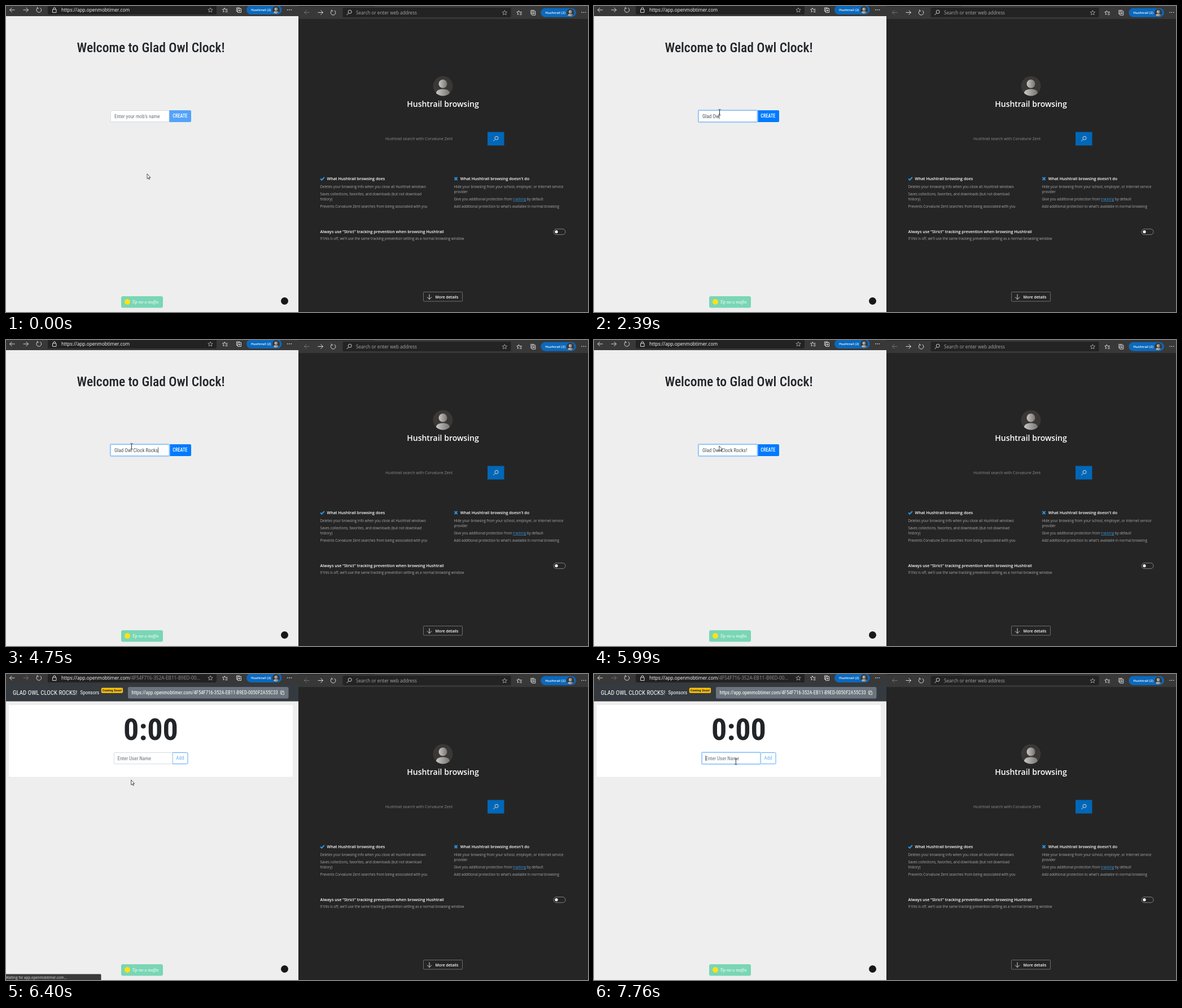
Write an HTML page that moves like this. It is 1031 by 543 pixels and loops after 8000 ms.

```html
<!DOCTYPE html>
<html lang="en">
<head>
<meta charset="utf-8">
<title>Mob timer demo</title>
<style>
html, body { margin: 0; width: 100%; height: 100%; overflow: hidden; background: #252525; }
svg { display: block; width: 1031px; height: 543px; }
text { white-space: pre; }
.site { font-family: "Roboto Condensed", "Open Sans", "Noto Sans", sans-serif; font-stretch: 75%; }
.ui { font-family: "Open Sans", "Noto Sans", sans-serif; }
.note { font-size: 6.22px; fill: #aaa; }
.head { font-size: 7.1px; font-weight: 600; fill: #fff; }
.line { fill: none; stroke: #d8d8d8; stroke-width: 1; }
</style>
</head>
<body>
<svg viewBox="0 0 1031 543">
  <defs>
    <linearGradient id="grey" x1="0" x2="1"><stop stop-color="#c9c7c5"/><stop offset="1" stop-color="#777472"/></linearGradient>
    <clipPath id="left"><path d="M0 0H518V543H0z"/></clipPath>
    <g id="person">
      <circle r="17.5" fill="#3a3735"/>
      <circle cy="-4" r="7.5" fill="url(#grey)"/>
      <path d="M-12 12.800C-12 8-7 5.500 0 5.500S12 8 12 12.800A17.500 17.500 0 0 1-12 12.800z" fill="url(#grey)"/>
    </g>
    <path id="arrow" class="line" d="M4.500 0H-4.500M-.5-4L-4.500 0L-.5 4"/>
    <g id="lens" class="line"><circle cx="1.200" cy="-1.200" r="3"/><path d="M-1 1L-4.500 4.500"/></g>
    <g id="tools">
      <g class="line">
        <path d="M55.800 3.500A4.300 4.300 0 1 0 60.500 3.300M55.400 1.800V4.200H58"/>
        <path stroke="#999" d="M362 3l1.200 2.800 3 .2-2.300 2 .8 3-2.700-1.700-2.700 1.700.8-3-2.300-2 3-.2z"/>
        <path d="M387 3.500l1 2.300 2.500.2M387 3.500l-1 2.300-2.500.2 2 1.800-.6 2.800 2-1.200M389 8H392.500M388.500 10.500H392.500M390.500 5.800H392.500"/>
        <path d="M410.500 4.500H416.500V11.500H410.500zM410 9.500H408.500V3H414.500M413.500 6V10M411.500 8H415.500"/>
      </g>
      <rect x="426" y="-1" width="62.500" height="16" rx="8" fill="#0b69bd"/>
      <text class="ui" x="434" y="9" font-size="6" font-weight="600" fill="#fff">Hushtrail (2)</text>
      <use href="#person" transform="translate(478.500 7) scale(.38)"/>
      <path d="M498 6.700h1.500M501.300 6.700h1.500M504.600 6.700h1.500" stroke="#ddd" stroke-width="1.400"/>
    </g>
  </defs>

  <g clip-path="url(#left)">
    <path fill="#eee" d="M0 17H518V543H0z"/>
    <path fill="#383838" d="M0 0H518V18H0z"/>
    <rect x="74" y="-4" width="299" height="19" rx="2" fill="#222"/>
    <use href="#arrow" x="11" y="7"/>
    <use id="forward" href="#arrow" transform="translate(35 7) scale(-1 1)"/>
    <path class="line" d="M82.500 6H89V11.500H82.500zM84 6V4a1.800 1.800 0 0 1 3.500 0V6"/>
    <use href="#tools"/>
    <text class="ui" x="98" y="10.300" font-size="8.200" fill="#fff">https://app.openmobtimer.com<tspan id="path" fill="#8f8f8f">/4F54F716-352A-EB11-B9ED-00...</tspan></text>

    <g id="home" class="site">
      <text x="256.500" y="82" text-anchor="middle" font-size="23.500" font-weight="500" fill="#212529">Welcome to Glad Owl Clock!</text>
      <path id="create" fill="#007bff" d="M289 185H326a2 2 0 0 1 2 2V204a2 2 0 0 1-2 2H289z"/>
      <rect id="ring1" x="183.700" y="183.700" width="106.800" height="23.600" rx="3" fill="#b3d1f2"/>
      <rect id="box1" x="185.300" y="185.500" width="103.700" height="20" rx="1.500" fill="#fff"/>
      <text x="308.300" y="198.300" text-anchor="middle" font-size="8.300" font-weight="500" fill="#fff">CREATE</text>
      <text id="name" x="192" y="198.800" font-size="9"></text>
    </g>

    <g id="mob" class="site">
      <path fill="#343a40" d="M0 18H518V48.500H0z"/>
      <text id="brand" x="12" y="37" font-size="10.900" fill="#fff"></text>
      <g id="links">
        <text x="41.300" y="36" font-size="9" fill="#fff">Sponsors</text>
        <rect x="78.500" y="24.500" width="38.300" height="9.300" rx="2" fill="#ffc107"/>
        <text x="97.600" y="31.300" text-anchor="middle" font-size="6.200" font-weight="700" fill="#212529">Coming Soon!</text>
      </g>
      <rect x="216" y="23" width="284.500" height="20.500" rx="2.500" fill="#6c757d"/>
      <text x="222.500" y="36" font-size="8.700" fill="#fff">https://app.openmobtimer.com/4F54F716-352A-EB11-B9ED-0050F2A55C33</text>
      <path class="line" stroke="#fff" d="M488 35.500H486.500V30H491.500V31.500M488.500 31.800H492.500V36.500H488.500z"/>
      <rect x="4.500" y="54.500" width="504" height="128.500" rx="1" fill="#fff" stroke="#e2e2e2" stroke-width=".5"/>
      <text x="256.500" y="116.500" text-anchor="middle" font-size="54" font-weight="700" fill="#212529">0:00</text>
      <path fill="#fff" stroke="#54a5fc" d="M295 139.500H320.500a1.500 1.500 0 0 1 1.500 1.500V158a1.500 1.500 0 0 1-1.500 1.500H295z"/>
      <rect id="ring2" x="189.700" y="137.700" width="106.600" height="23.600" rx="3" fill="#bfdeff"/>
      <rect id="box2" x="191.300" y="139.500" width="103.500" height="20" rx="1.500" fill="#fff"/>
      <text x="308.400" y="152.300" text-anchor="middle" font-size="9" fill="#6bb0fb">Add</text>
      <text x="197.500" y="152.800" font-size="9" fill="#6c757d">Enter User Name</text>
    </g>

    <rect x="204" y="515" width="74" height="20.500" rx="3" fill="#79d6b5"/>
    <circle cx="215" cy="525" r="5" fill="#ffe11a"/>
    <text x="223.500" y="528" font-size="7.500" font-style="italic" font-family="cursive" fill="#fff">Tip me a muffin</text>
    <circle cx="493.500" cy="523.500" r="6.500" fill="#191717"/>
    <g id="status">
      <path fill="#3a3a3a" d="M0 532.500H167a1.500 1.500 0 0 1 1.500 1.500V543H0z"/>
      <text class="ui" x="-1" y="540.500" font-size="6.200" fill="#ddd">Waiting for app.openmobtimer.com...</text>
    </g>
    <path id="caret" stroke="#333" stroke-width=".8"/>
    <path id="pointer" fill="#fff" stroke="#222" stroke-width=".8" d="M0 0V8.800L2 7 3.400 10 4.600 9.400 3.300 6.600H6z"/>
    <path id="beam" fill="none" stroke="#222" stroke-width=".9" d="M-2-5H-.7L0-4.300.7-5H2M0-4.300V4.300M-2 5H-.7L0 4.300.7 5H2"/>
  </g>

  <g>
    <path fill="#252525" d="M518 0H1031V543H518z"/>
    <path fill="#383838" d="M518 0H1031V23H518z"/>
    <path fill="#1c1c1c" d="M518 0H652V.8H518z"/>
    <rect x="596.500" y="3" width="298" height="17" rx="2" fill="#232323"/>
    <use href="#arrow" x="533" y="11.500" opacity=".35"/>
    <use href="#arrow" transform="translate(557 11.500) scale(-1 1)"/>
    <use href="#lens" x="608" y="11.500"/>
    <use href="#tools" x="521.300" y="4.700"/>
    <text class="ui" x="620" y="14.800" font-size="8.100" fill="#a6a6a6">Search or enter web address</text>

    <use href="#person" x="774" y="142"/>
    <g class="ui">
      <text x="774" y="179" text-anchor="middle" font-size="14" font-weight="600" fill="#fff">Hushtrail browsing</text>
      <text x="672" y="238.300" font-size="6.950" fill="#8c8c8c">Hushtrail search with Corvalune Zent</text>
      <path fill="#0067b8" d="M853 223.500H882.500V247.500H853z"/>
      <use href="#lens" x="867.800" y="235.500"/>
      <path fill="none" stroke="#2f94dc" stroke-width="2" d="M557 306.500l2.300 2.300 4.500-4.800M794.500 304l5 5M799.500 304l-5 5"/>
      <g id="copy"></g>
      <rect x="970" y="395.700" width="21" height="10" rx="5" fill="none" stroke="#999" stroke-width=".8"/>
      <circle cx="975" cy="400.700" r="2.600" fill="#fff"/>
      <rect x="739.500" y="507.500" width="69" height="16.500" rx="1" fill="none" stroke="#777" stroke-width=".9"/>
      <use href="#arrow" transform="translate(750 516) rotate(-90)"/>
      <text x="760.500" y="518.500" font-size="6.800" font-weight="600" fill="#fff">More details</text>
    </g>
  </g>
</svg>
<script>
const $ = id => document.getElementById(id);
const set = (id, attrs) => { for (const k in attrs) $(id).setAttribute(k, attrs[k]); };
const show = (id, on) => { $(id).style.display = on ? "" : "none"; };

const copy = [
  ["head", 568.5, 309, "What Hushtrail browsing does"],
  ["note", 556.5, 323, "Deletes your browsing info when you close all Hushtrail windows"],
  ["note", 556.5, 336, "Saves collections, favorites, and downloads (but not download"],
  ["note", 556.5, 345, "history)"],
  ["note", 556.5, 358, "Prevents Corvalune Zent searches from being associated with you"],
  ["head", 804.8, 309, "What Hushtrail browsing doesn't do"],
  ["note", 793.5, 323, "Hide your browsing from your school, employer, or internet service"],
  ["note", 793.5, 332, "provider"],
  ["note", 793.5, 345, 'Give you additional protection from <tspan fill="#3a9be0" text-decoration="underline">tracking</tspan> by default'],
  ["note", 793.5, 358, "Add additional protection to what's available in normal browsing"],
  ["head", 556.5, 403.3, "Always use “Strict” tracking prevention when browsing Hushtrail"],
  ["note", 556.5, 415.3, "If this is off, we'll use the same tracking prevention setting as a normal browsing window"]
];
$("copy").innerHTML = copy.map(([c, x, y, s]) => `<text class="${c}" x="${x}" y="${y}">${s}</text>`).join("");

const LOOP = 8000, FOCUS1 = 1060, OPEN = 6110, NAMED = 6250, LOADED = 6550, FOCUS2 = 7620;
const mobName = "Glad Owl Clock Rocks!";

// [time, letters typed]
const keys = [
  [0, 0], [1700, 1], [1840, 2], [1980, 3], [2110, 4], [2250, 6], [2390, 7],
  [2650, 8], [2790, 10], [2920, 11], [3060, 12], [3200, 13], [3340, 14],
  [4000, 16], [4160, 17], [4320, 18], [4480, 19], [4750, 20], [5120, 21]
];
// [time, x, y, is text beam]
const moves = [
  [0, 250, 297.8, 0], [250, 247, 280, 0], [380, 236, 228, 0], [510, 223, 178, 0],
  [640, 222, 166, 0], [780, 222.5, 188.5, 1], [5990, 221.7, 188, 0],
  [7080, 238, 199.5, 0], [7220, 247, 182, 0], [7350, 251, 166, 0], [7490, 251.3, 155.5, 1]
];
const at = (table, t) => table.findLast(row => row[0] <= t);
const ramp = (t, start) => t < start ? 0 : t < start + 120 ? .5 : 1;

function input(n, focus) {
  set("ring" + n, { opacity: focus });
  set("box" + n, { stroke: focus ? "#80bdff" : "#ced4da", "stroke-width": focus ? 1 : .8 });
}

function render(t) {
  const [keyTime, typed] = at(keys, t);
  const [, x, y, beam] = at(moves, t);
  const mob = t >= OPEN;

  show("home", !mob);
  show("mob", mob);
  show("path", mob);
  show("status", mob && t < LOADED);
  set("forward", { opacity: mob ? .35 : 1 });

  $("name").textContent = typed ? mobName.slice(0, typed) : "Enter your mob's name";
  set("name", { fill: typed ? "#495057" : "#6c757d" });
  set("create", { "fill-opacity": .65 + .35 * ramp(t, keys[1][0]) });
  input(1, ramp(t, FOCUS1));
  input(2, ramp(t, FOCUS2));

  $("brand").textContent = t < NAMED ? "TEST" : mobName.toUpperCase();
  set("links", { transform: `translate(${t < NAMED ? 0 : 90.3} 0)` });

  const since = t - (mob ? FOCUS2 : Math.max(FOCUS1, keyTime));
  show("caret", since >= 0 && since % 1000 < 500);
  const caretX = mob ? 198 : 192.4 + (typed ? $("name").getComputedTextLength() : 0);
  set("caret", { d: `M${caretX} ${mob ? 144.5 : 190.5}v10` });

  show("pointer", !beam);
  show("beam", beam);
  set(beam ? "beam" : "pointer", { transform: `translate(${x} ${y})` });
}

const start = performance.now();
function tick(now) {
  render(Math.max(0, now - start) % LOOP);
  requestAnimationFrame(tick);
}
render(0);
requestAnimationFrame(tick);
</script>
</body>
</html>
```
